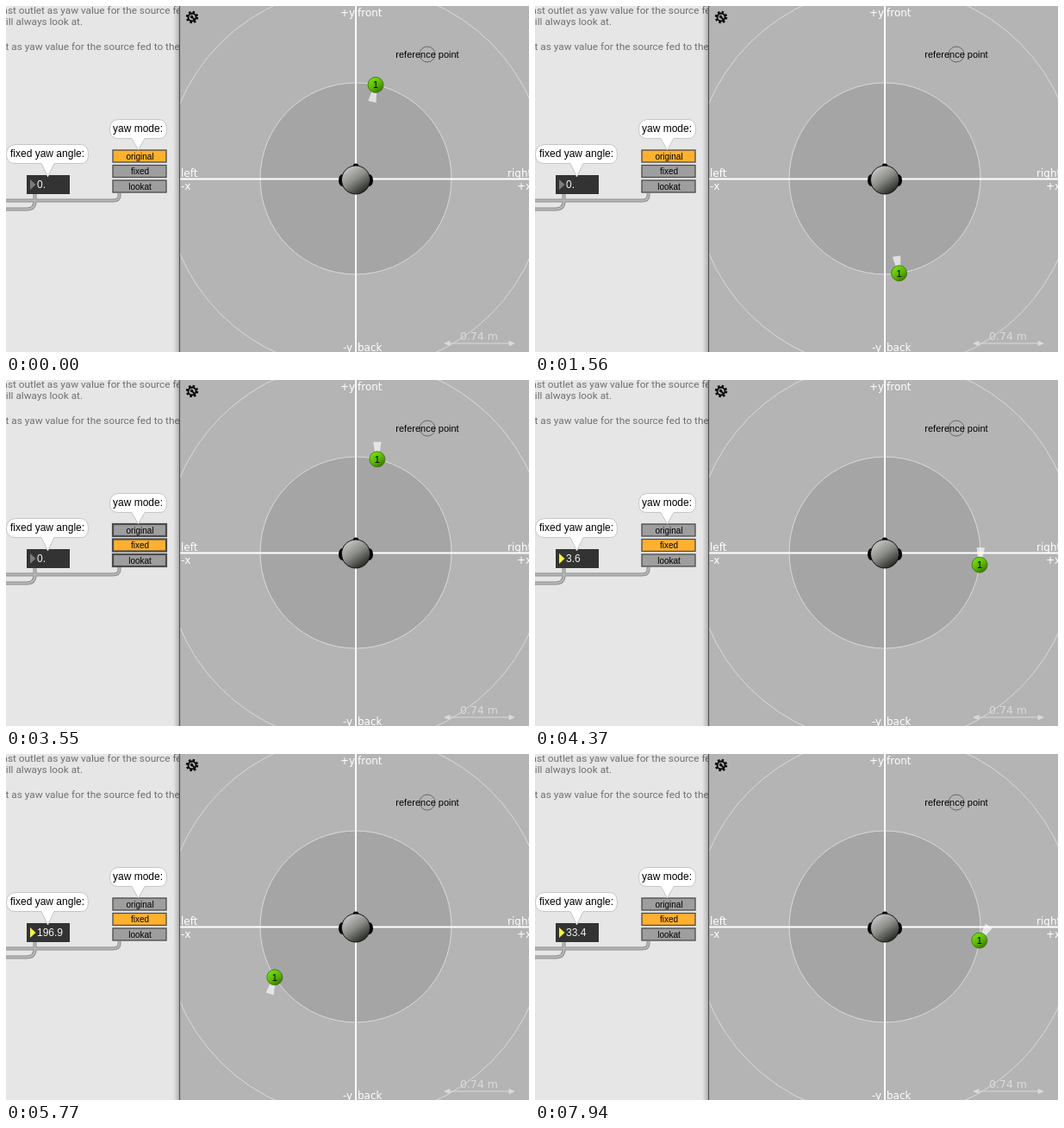
An HTML page that plays this animation: 607x401 px, repeating every 7990 ms.

```html
<!DOCTYPE html>
<html lang="en">
<head>
<meta charset="utf-8">
<title>Source yaw modes</title>
<style>
  html, body { margin: 0; width: 100%; height: 100%; overflow: hidden; background: #e6e6e6; }
  svg { display: block; width: 607px; height: 401px; }
  text { font: 12px "Liberation Sans", Arial, sans-serif; white-space: pre; }
  .note text { font: 11.8px Roboto, sans-serif; fill: #707070; }
  .axis text { font: 12px "DejaVu Sans", sans-serif; fill: #fff; }
  .bubble { fill: #fff; stroke: #c6c6c6; }
  .modes rect { fill: #9e9e9e; stroke: #4b4b4b; stroke-width: 1.3; }
  .modes .on rect { fill: #ffb02f; }
  .modes.focus rect { stroke-width: 2.2; }
  .modes text { font-size: 10px; text-anchor: middle; }
  .cord { fill: none; stroke: #8c8c8c; stroke-width: 4; }
  .cord.core { stroke: #b9b9b9; stroke-width: 2; }
  .ring { stroke: #dadada; }
</style>
</head>
<body>
<svg viewBox="0 0 607 401">
  <defs>
    <linearGradient id="headFill" x1=".2" y1=".1" x2=".8" y2=".95">
      <stop stop-color="#c4c4c4"/><stop offset=".45" stop-color="#8b8d88"/><stop offset="1" stop-color="#20221d"/>
    </linearGradient>
    <linearGradient id="ballFill" x1=".2" y1=".1" x2=".8" y2=".95">
      <stop stop-color="#74e00c"/><stop offset=".5" stop-color="#5cb800"/><stop offset="1" stop-color="#397400"/>
    </linearGradient>
    <linearGradient id="edgeShade">
      <stop stop-color="#000" stop-opacity="0"/><stop offset="1" stop-color="#000" stop-opacity=".22"/>
    </linearGradient>
    <clipPath id="panel"><path d="M202 0H607V401H202z"/></clipPath>
  </defs>

  <path fill="#e6e6e6" d="M0 0H607V401H0z"/>
  <g class="note">
    <text x="-4.5" y="9">ast outlet as yaw value for the source fed</text>
    <text x="-9" y="22">will always look at.</text>
    <text x="-.5" y="51">t as yaw value for the source fed to the</text>
  </g>

  <path class="cord" d="M131.5 217V220Q131.5 225.500 124 225.500H0M33.500 218V226Q33.500 235.500 24 235.500H0"/>
  <path class="cord core" d="M131.5 217V220Q131.5 225.500 124 225.500H0M33.500 218V226Q33.500 235.500 24 235.500H0"/>

  <g class="modes" id="modes">
    <g><rect x="124" y="167" width="62" height="14"/><text x="155.500" y="178">original</text></g>
    <g><rect x="124" y="184.500" width="62" height="14"/><text x="155.500" y="195">fixed</text></g>
    <g><rect x="124" y="202" width="62" height="14"/><text x="155.500" y="213">lookat</text></g>
  </g>

  <path fill="#333" d="M24 196H74V218H24z"/>
  <path id="grip" d="M28 201L34.500 207L28 213z"/>
  <text id="value" x="36" y="211" fill="#f2f2f2"></text>

  <path class="bubble" d="M130 131.500H177Q186.500 131.500 186.500 143T177 153.500H161L153.500 167L146 153.500H130Q120.500 153.500 120.500 143T130 131.500z"/>
  <text x="124" y="146">yaw mode:</text>
  <path class="bubble" d="M11 160.500H86Q95.500 160.500 95.500 172T86 182.500H56L48.500 198L41 182.500H11Q.5 182.500 .5 172T11 160.500z"/>
  <text x="5" y="175">fixed yaw angle:</text>

  <path fill="url(#edgeShade)" d="M194 0H201V401H194z"/>
  <g clip-path="url(#panel)">
    <path fill="#b4b4b4" d="M202 0H607V401H202z"/>
    <circle class="ring" cx="406" cy="200" r="222" fill="none"/>
    <circle class="ring" cx="406" cy="200" r="111" fill="#a5a5a5"/>
    <path stroke="#fff" stroke-width="2" d="M406 0V401M202 200.500H607"/>
    <g class="axis">
      <text x="388" y="12">+y</text><text x="408" y="12">front</text>
      <text x="391" y="400">-y</text><text x="408" y="400">back</text>
      <text x="203" y="198">left</text><text x="203" y="213">-x</text>
      <text x="582" y="198">right</text><text x="593" y="213">+x</text>
      <text x="527" y="387" style="font-size:12.5px;fill:#dadada">0.74 m</text>
    </g>
    <path stroke="#dadada" fill="#dadada" d="M511 391H588M509 391L515 388.500V393.500zM590 391L584 388.500V393.500z"/>
    <g transform="translate(216 13)" fill="none" stroke="#000">
      <circle r="6" stroke-width="2.4" stroke-dasharray="2.356"/>
      <circle r="4.500" stroke-width="1.800"/>
      <path stroke-width="1.800" d="M-1 -1L3.500 3.500"/><circle cx="-.6" cy="-.6" r="1.400"/>
    </g>
    <ellipse cx="390.500" cy="202" rx="4.500" ry="7"/>
    <ellipse cx="421.500" cy="202" rx="4.500" ry="7"/>
    <circle cx="406" cy="186" r="3.500"/>
    <circle cx="406" cy="201.500" r="16.500" fill="url(#headFill)" stroke="#111"/>
    <circle cx="489" cy="56" r="9" fill="none" stroke="#555" stroke-width=".8"/>
    <text x="489" y="60" text-anchor="middle" style="font-size:11px">reference point</text>
    <g id="ball">
      <path id="flag" fill="#fff" fill-opacity=".66" d="M-2.800 -8L-4.700 -20H4.700L2.800 -8z"/>
      <circle r="9" fill="url(#ballFill)" stroke="#3b6b08" stroke-width=".8"/>
      <text y="4" text-anchor="middle" style="font-size:11px">1</text>
    </g>
  </g>
  <path stroke="#555" stroke-width="1.200" d="M201.500 0V401"/>
</svg>
<script>
  const LOOP = 7990;
  const el = id => document.getElementById(id);
  const [modes, grip, value, ball, flag] = ['modes', 'grip', 'value', 'ball', 'flag'].map(el);

  // [time in ms, display step]: the picture advances in slightly uneven steps
  const pace = [[0, 0], [30, 1], [870, 19], [1690, 37], [2530, 55], [3370, 73], [4190, 91],
    [5000, 108], [5820, 126], [6640, 144], [7480, 162], [LOOP, 173]];

  // [display step, fixed yaw in degrees]: the number box being dragged
  const drag = [[91, 0], [95, 3.6], [99, 12.4], [107, 57.3], [109, 95.2], [115, 172.1], [121, 191.3],
    [125, 196.9], [127, 193.8], [132, 118.6], [138, -25.3], [143, -84.2], [146, -89.7], [152, -87.9],
    [158, -80.4], [161, -67.5], [162, -34.8], [163, 3.2], [167, 24.1], [172, 33.4]];

  function along(points, x) {
    if (x <= points[0][0]) return points[0][1];
    for (let i = 1; i < points.length; i++) {
      const [x0, y0] = points[i - 1], [x1, y1] = points[i];
      if (x <= x1) return y0 + (y1 - y0) * (x - x0) / (x1 - x0);
    }
    return points[points.length - 1][1];
  }

  function draw(t) {
    const step = Math.min(172, Math.floor(along(pace, t) + 0.25));
    const angle = 12 + 4.688 * step;
    const rad = angle * Math.PI / 180;
    const fixed = step >= 46;
    const yaw = along(drag, step);

    ball.setAttribute('transform',
      `translate(${406 + 111 * Math.sin(rad)} ${200 - 111 * Math.cos(rad)})`);
    flag.setAttribute('transform', `rotate(${fixed ? yaw : angle + 180})`);

    modes.classList.toggle('focus', fixed && step < 85);
    [...modes.children].forEach((mode, i) => mode.classList.toggle('on', i === +fixed));
    grip.setAttribute('fill', step < 85 ? '#7c7c7c' : '#f2f24a');
    value.textContent = yaw ? yaw.toFixed(1) : '0.';
  }

  const start = performance.now();
  function tick() {
    draw((performance.now() - start) % LOOP);
    requestAnimationFrame(tick);
  }
  tick();
</script>
</body>
</html>
```
